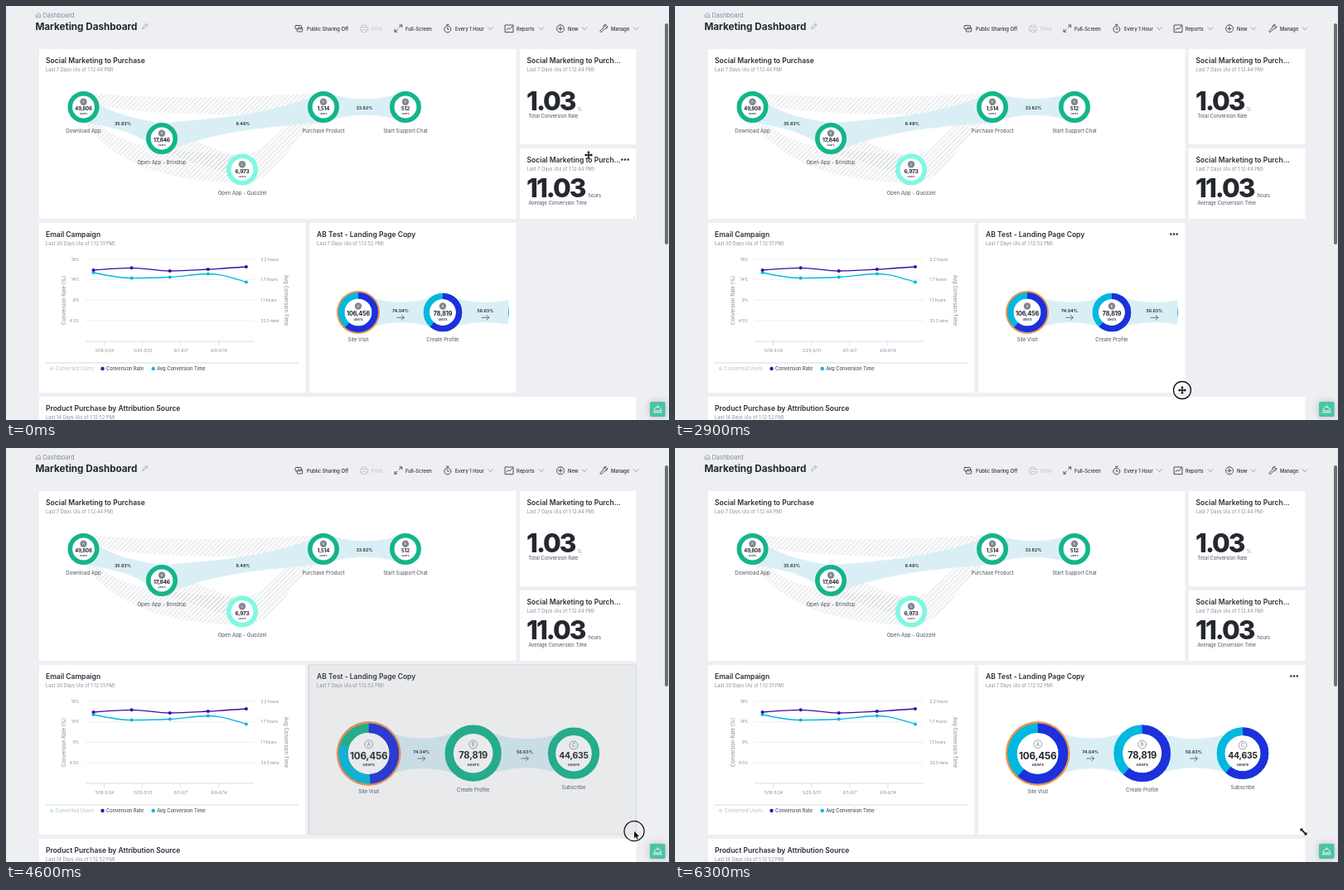
Animation, 800 px wide and 500 px high, one loop 6.4 s. Source, as an HTML page:

```html
<!DOCTYPE html>
<html lang="en">
<head>
<meta charset="utf-8">
<title>Marketing Dashboard</title>
<style>
html, body { margin: 0; width: 100%; height: 100%; overflow: hidden; background: #eeeff3; }
svg { display: block; width: 800px; height: 500px; font-family: Inter, sans-serif; }
text { fill: #4b5060; font-size: 5.8px; }
.h1 { font-size: 11.65px; font-weight: 700; fill: #23262e; }
.title { font-size: 8.5px; font-weight: 600; fill: #2b2e36; }
.sub { font-size: 5.7px; fill: #8b8f9c; }
.crumb { font-size: 7.4px; fill: #858996; }
.tool { font-weight: 500; fill: #2d3038; }
.off { fill: #c3c6ce; }
.mid { text-anchor: middle; }
.end { text-anchor: end; }
.big { font-size: 31.5px; font-weight: 800; letter-spacing: -2px; fill: #25282f; }
.num { font-weight: 700; fill: #23262e; letter-spacing: -.2px; }
.users { font-weight: 600; fill: #33363e; }
.name { font-size: 6.1px; }
.pct { font-size: 5.3px; font-weight: 600; fill: #22252c; }
.tick { font-size: 4.8px; fill: #80859a; }
.axis { font-size: 6.1px; fill: #80859a; }
.legend { font-size: 5.75px; font-weight: 500; }
.badge { fill: #fff; }
.outlined { fill: #6c747e; }
.card { fill: #fff; }
.flow { fill: #daeff5; }
.hatch { fill: url(#hatch); }
.icon { fill: none; stroke: #3a3d45; stroke-width: .9; stroke-linejoin: round; stroke-linecap: round; }
.help { filter: drop-shadow(0 0 4px rgba(40, 50, 70, .28)); }
</style>
</head>
<body>
<svg id="stage" viewBox="0 0 800 500"></svg>
<script>
const LOOP = 6400, STEP = 100;
const BLUE = '#1f2fdc', CYAN = '#02b8de', GREEN = '#14b58b', PURPLE = '#3a0ca8', BLUE_SHARE = .615;

const text = (x, y, s, cls = '', size) =>
  `<text x="${x}" y="${y}" class="${cls}"${size ? ` style="font-size:${size}px"` : ''}>${s}</text>`;
const rect = (x, y, w, h, attrs) => `<rect x="${x}" y="${y}" width="${w}" height="${h}" ${attrs}/>`;
const dot = (x, y, r, fill, attrs = '') => `<circle cx="${x}" cy="${y}" r="${r}" fill="${fill}" ${attrs}/>`;
const path = (d, attrs) => `<path d="${d}" ${attrs}/>`;
const icon = (d, attrs = '') => path(d, `class="icon" ${attrs}`);
const heading = (x, y, title, sub) => text(x, y, title, 'title') + text(x, y + 10, sub, 'sub');
const chevron = x => icon(`M${x - 2.8} 25.8l2.8 3 2.8-3`, 'style="stroke:#777b86;stroke-width:.7"');

// Three dots plus the resize corner, which sits "drop" below them.
const menu = (id, drop) => `<g id="${id}">${[-3.7, 0, 3.7].map(x => dot(x, 0, 1.25, '#2b2e36')).join('')}
  ${path(`M11.5 ${drop}v1.3h-1.3`, 'fill="none" stroke="#a5a8b0" stroke-width=".6"')}</g>`;

// Band between two nodes that is pinched in the middle.
function band(x1, y1, h1, x2, y2, h2, pinch) {
  const a = x1 + (x2 - x1) * .36, b = x1 + (x2 - x1) * .64, m = (y1 + y2) / 2;
  return path(`M${x1} ${y1 - h1}C${a} ${m - pinch} ${b} ${m - pinch} ${x2} ${y2 - h2}
    V${y2 + h2}C${b} ${m + pinch} ${a} ${m + pinch} ${x1} ${y1 + h1}Z`, 'class="flow"');
}

function header() {
  return icon('M36.5 10.5l2.7-2 2.7 2v3.2h-5.4zM38 11.8h2.4', 'style="stroke:#858996;stroke-width:.7"') +
    text(44.5, 14, 'Dashboard', 'crumb') + text(35.5, 29, 'Marketing Dashboard', 'h1') +
    icon('M164.8 27.3l.6-2.1 4.2-4 1.5 1.5-4.2 4zM168.6 22.2l1.5 1.5', 'style="stroke:#9598a3;stroke-width:.7"') +
    icon('M350 23.5h5.5q1 0 1 1v2.2q0 1-1 1H350q-1 0-1-1v-2.2q0-1 1-1zM352.5 26h4q1.2 0 1.2 1v3q0 1-1 1h-4.5q-1 0-1-1v-2') +
    text(363, 29.6, 'Public Sharing Off', 'tool') +
    icon('M429.5 25.5v-2.5h5v2.5M429 30h-1.5v-4.5h9v4.5H435M429.5 28.5h5v3h-5z', 'style="stroke:#c3c6ce"') +
    text(441, 29.6, 'Print', 'tool off') +
    icon('M474.5 25.7l3-2.7M475 23h2.7v2.7M472.3 28l-3 3M469 28.5v2.7h2.7') +
    text(482, 29.6, 'Full-Screen', 'tool') +
    icon('M532.8 24a4 4 0 1 0 .1 0M531.5 22.3h2.7M532.8 26v2.2h1.5') +
    text(542, 29.6, 'Every 1 Hour', 'tool') + chevron(584.5) +
    icon('M602.5 23h9.5v8.7h-9.5zM604 29l2-2.5 1.8 1.5 3-3.5') +
    text(616, 29.6, 'Reports', 'tool') + chevron(646) +
    icon('M669 22.8a4.5 4.5 0 1 0 .1 0M669 25v4.6M666.7 27.3h4.6') +
    text(678, 29.6, 'New', 'tool') + chevron(698) +
    icon('M717 30l4-4q-.7-2.5 1.8-3.5l1.3-.1-1.6 1.8 1.5 1.5 1.7-1.7q.5 3.5-3.3 3.6l-4 4z') +
    text(730, 29.6, 'Manage', 'tool') + chevron(760);
}

function smallNode(x, y, color, letter, count, size, label) {
  return dot(x, y, 16.2, '#fff', `stroke="${color}" stroke-width="5.6"`) +
    dot(x, y - 6.3, 4.2, '#7e8791') + text(x, y - 4.8, letter, 'mid badge', 4) +
    text(x, y + 4.3, count, 'num mid', size) + text(x, y + 9, 'users', 'users mid', 3.3) +
    text(x, y + 30.5, label, 'name mid');
}

function funnel() {
  return rect(40, 52, 575.5, 205, 'class="card"') +
    heading(48, 69.3, 'Social Marketing to Purchase', 'Last 7 Days (As of 1:12:44 PM)') +
    path('M94 104C150 112 300 112 383 104V131C310 132 190 133 120 122Z', 'class="hatch"') +
    path('M94 122C130 176 190 172 285 181V214C190 212 130 190 94 140Z', 'class="hatch"') +
    path('M188 142C220 156 245 176 285 180V205C245 198 220 184 188 178Z', 'class="hatch"') +
    path('M285 180C322 178 340 122 383 122V140C350 142 332 212 285 216Z', 'class="hatch"') +
    band(94, 122, 18, 188, 160, 18, 7) +
    band(188, 160, 18, 383, 122, 18, 7) +
    band(383, 122, 18, 482, 122, 18, 7) +
    smallNode(93.5, 122, GREEN, 'A', '49,808', 6, 'Download App') +
    smallNode(188, 160, GREEN, 'B', '17,846', 6.7, 'Open App - Brindlop') +
    smallNode(285, 197.5, '#80f8e2', 'C', '6,973', 6.5, 'Open App - Quozzel') +
    smallNode(383, 122, GREEN, 'D', '1,514', 6.2, 'Purchase Product') +
    smallNode(482, 122, GREEN, 'E', '512', 6.2, 'Start Support Chat') +
    text(141, 144, '35.83%', 'pct mid') + text(286, 144, '8.48%', 'pct mid') + text(432.5, 125, '33.82%', 'pct mid');
}

function metrics() {
  const card = (y, h) => rect(620, y, 140.5, h, 'class="card"') +
    heading(628.5, y + 17.3, 'Social Marketing to Purch...', 'Last 7 Days (As of 1:12:44 PM)');
  return card(52, 115) + text(628, 126, '1.03', 'big') + text(689.5, 126.7, '%', 'sub') +
    text(630.5, 134.5, 'Total Conversion Rate') +
    card(172, 85) + text(628, 230.5, '11.03', 'big') + text(702.5, 231.3, 'hours') +
    text(630.5, 239.6, 'Average Conversion Time') +
    `<g transform="translate(747 185.5)">${menu('metricMenu', 68.5)}</g>`;
}

// Monotone curve: flat at every local extreme.
function series(ys, color) {
  const gap = 46.1, xs = ys.map((_, i) => 105.5 + i * gap), last = ys.length - 1;
  const rise = i => ys[i + 1] - ys[i];
  const inner = i => rise(i - 1) * rise(i) > 0 ? (rise(i - 1) + rise(i)) / 2 : 0;
  const slope = i => i === 0 ? (3 * rise(0) - inner(1)) / 2
    : i === last ? (3 * rise(last - 1) - inner(last - 1)) / 2 : inner(i);
  let d = `M${xs[0]} ${ys[0]}`;
  for (let i = 1; i <= last; i++)
    d += `C${xs[i - 1] + gap / 3} ${ys[i - 1] + slope(i - 1) / 3} ${xs[i] - gap / 3} ${ys[i] - slope(i) / 3} ${xs[i]} ${ys[i]}`;
  return path(d, `fill="none" stroke="${color}" stroke-width="1.3"`) +
    xs.map((x, i) => dot(x, ys[i], 2, color)).join('');
}

function campaign() {
  const rows = [['18%', '2.2 hours'], ['14%', '1.7 hours'], ['9%', '1.1 hours'], ['4.5%', '33.3 mins']];
  const weeks = ['5/18-5/24', '5/25-5/31', '6/1-6/7', '6/8-6/14'];
  const key = (x, color, label, cls = '') => dot(x, 438, 2.2, color) + text(x + 4.5, 440.2, label, 'legend ' + cls);
  return rect(40, 262, 321.5, 205, 'class="card"') +
    heading(48, 279.3, 'Email Campaign', 'Last 30 Days (As of 1:12:51 PM)') +
    rows.map(([l, r], i) => {
      const y = 306 + i * 24.7;
      return path(`M96 ${y}H299.5`, 'stroke="#e6e8ee" stroke-width=".7"') +
        text(88.5, y + 1.7, l, 'tick end') + text(307.5, y + 1.7, r, 'tick');
    }).join('') +
    path('M96 405H299.5', 'stroke="#cdd3e4" stroke-width=".8"') +
    weeks.map((w, i) => path(`M${118.5 + i * 46.1} 405v5`, 'stroke="#cdd3e4" stroke-width=".8"') +
      text(119 + i * 46, 418, w, 'tick mid')).join('') +
    `<g transform="translate(71.5 355.5) rotate(-90)">${text(0, 0, 'Conversion Rate (%)', 'axis mid')}</g>
     <g transform="translate(335.5 355.5) rotate(90)">${text(0, 0, 'Avg Conversion Time', 'axis mid')}</g>` +
    series([322, 328.6, 327.5, 323.5, 333.5], CYAN) + series([319, 316.3, 320, 318, 315], PURPLE) +
    path('M48 431H353', 'stroke="#d3d5dc" stroke-width=".9"') +
    key(55, '#c4f0e5', 'Converted Users', 'off') + key(116.5, PURPLE, 'Conversion Rate') +
    key(177.7, CYAN, 'Avg Conversion Time');
}

function donut(n, large) {
  const { x, y, r, hole, letter, count, size, label, labelY } = n;
  const w = r - hole, mid = (r + hole) / 2;
  const arc = (cls, color) => dot(x, y, mid, 'none',
    `class="${cls}" pathLength="1" stroke="${color}" stroke-width="${w}" transform="rotate(-90 ${x} ${y})"`);
  const by = y - (large ? r * .31 : 7.5);
  const badge = large
    ? dot(x, by, 4.9, '#fff', 'stroke="#7e8791" stroke-width=".8"') + text(x, by + 2.1, letter, 'mid outlined', 5.8)
    : dot(x, by, 4.2, '#7e8791') + text(x, by + 1.5, letter, 'mid badge', 4);
  return '<g class="donut">' + (letter === 'A' ? dot(x, y, r + (large ? 2.4 : 2), '#f5924a') : '') +
    dot(x, y, mid, '#fff', `stroke="${GREEN}" stroke-width="${w - .4}"`) + arc('cyan', CYAN) + arc('blue', BLUE) +
    badge + text(x, y + (large ? 6.5 : 4.2), count, 'num mid', size) +
    text(x, y + (large ? 14.8 : 10), 'users', 'users mid', large ? 5.4 : 4) +
    text(x, labelY, label, 'name mid') + '</g>';
}

function abChart(id, nodes, halves, pinch, mids, large) {
  const [a, b, c] = nodes, y = large ? 368.5 : 369.8;
  const link = (x, s) => text(x, y, s, 'pct mid') +
    icon(`M${x - 4.3} ${y + 6.5}h8.6m-3-3l3 3l-3 3`, 'style="stroke-width:.7"');
  return `<g id="${id}">` + band(a.x, a.y, halves[0], b.x, b.y, halves[1], pinch) +
    band(b.x, b.y, halves[1], c.x, c.y, halves[2], pinch) +
    link(mids[0], '74.04%') + link(mids[1], '56.63%') + nodes.map(n => donut(n, large)).join('') + '</g>';
}

const node = (letter, label, count, x, y, r, hole, size, labelY) => ({ letter, label, count, x, y, r, hole, size, labelY });
const smallNodes = [
  node('A', 'Site Visit', '106,456', 425, 370, 24, 16.5, 7.3, 405),
  node('B', 'Create Profile', '78,819', 527, 370, 23.3, 16, 7.3, 405),
  node('C', 'Subscribe', '44,635', 628.8, 370, 23, 16, 7.3, 405)];
const largeNodes = [
  node('A', 'Site Visit', '106,456', 437.7, 369, 36.5, 25, 11.7, 416.5),
  node('B', 'Create Profile', '78,819', 563.7, 368.7, 34.3, 23.6, 11.2, 415),
  node('C', 'Subscribe', '44,635', 685, 368.7, 31.3, 21.6, 10.4, 411.5)];

function abCard() {
  return rect(365.5, 262, 0, 205, 'id="slot" fill="#e0e2e8"') + rect(366, 262, 0, 205, 'id="abBox" class="card"') +
    heading(375, 279.3, 'AB Test - Landing Page Copy', 'Last 7 Days (As of 1:12:52 PM)') +
    `<g clip-path="url(#abClip)">${abChart('small', smallNodes, [23, 22, 21], 9, [476, 578.5], false)}
    ${abChart('large', largeNodes, [36, 33, 30], 13, [501.3, 626], true)}</g>` +
    rect(365.5, 261.8, 0, 205, 'id="shade" fill="#767c8c" fill-opacity=".16" stroke="#767c8c" stroke-opacity=".2" stroke-width=".8"') +
    menu('abMenu', 188.5);
}

const pointerShape = d => path(d, 'fill="#111" stroke="#fff" stroke-width=".6" paint-order="stroke"');
const cursors = {
  move: pointerShape('M0-5l2 2.3H.7V-.7H2.7V-2L5 0 2.7 2V.7H.7V2.7H2L0 5-2 2.7H-.7V.7H-2.7V2L-5 0-2.7-2V-.7H-.7V-2.7H-2Z'),
  arrow: pointerShape('M0 0V8.6L2 6.8 3.3 9.8 4.7 9.2 3.4 6.3H6Z'),
  resize: pointerShape('M-4-4H-.4L-1.5-2.7 2.7 1.5 4 .4V4H.4L1.5 2.7-2.7-1.5-4-.4Z')
};

const stage = document.getElementById('stage');
stage.innerHTML = `<defs>
  <pattern id="hatch" width="4" height="4" patternUnits="userSpaceOnUse" patternTransform="rotate(45)">
    <path d="M1 0V4" stroke="#c9cbd0" stroke-width=".7"/></pattern>
  <clipPath id="abClip">${rect(366, 290, 0, 170, 'id="clipBox"')}</clipPath></defs>` +
  rect(0, 0, 800, 500, 'fill="#eeeff3"') + header() + funnel() + metrics() + campaign() +
  rect(40, 472, 720.5, 28, 'class="card"') +
  heading(48, 489.3, 'Product Purchase by Attribution Source', 'Last 14 Days (As of 1:12:52 PM)') + abCard() +
  rect(795, 21, 4, 267, 'rx="2" fill="#6d6e72"') +
  rect(777, 478, 18.5, 18, 'rx="1.5" fill="#4cc3a2" class="help"') +
  icon('M782 488.5a4.3 4.3 0 0 1 8.6 0zM781 490.8h10.6M786.3 484v-1.5', 'style="stroke:#fff"') +
  '<g id="cursor">' + dot(0, 0, 10.5, 'none', 'id="press" stroke="#15161a" stroke-width="1.3"') +
  Object.entries(cursors).map(([k, v]) => `<g id="${k}">${v}</g>`).join('') + '</g>';

const $ = id => document.getElementById(id);
const show = (id, on) => $(id).setAttribute('display', on ? 'inline' : 'none');
const donuts = [...$('large').querySelectorAll('.donut')];

const route = [
  [0, 703, 180], [200, 702, 186], [500, 684, 258], [900, 607, 400], [1100, 612, 412], [1400, 621, 417],
  [1700, 618, 440], [2100, 612, 464], [2900, 612, 464], [3100, 618, 463.5], [3300, 649, 462], [3400, 660.5, 462],
  [3600, 717, 462], [3800, 750, 461], [4000, 760, 461], [4100, 758, 461], [4700, 758, 463], [LOOP, 758.5, 463.5]];

function pointer(t) {
  const i = Math.max(1, route.findIndex(p => p[0] >= t));
  const [a, b] = [route[i - 1], route[i]], k = (t - a[0]) / (b[0] - a[0]);
  return [a[1] + (b[1] - a[1]) * k, a[2] + (b[2] - a[2]) * k];
}

const GROW = 4400, DROP = 5300;

function cursorKind(t) {
  if (t < 500) return 'move';
  if (t < 800) return 'arrow';
  if (t < 1100) return 'move';
  if (t < 1800) return 'arrow';
  if (t < 3000) return 'move';
  if (t < 3900) return 'resize';
  return t < DROP ? 'arrow' : 'resize';
}

function sweep(group, p) {
  for (const [cls, share] of [['cyan', 1], ['blue', BLUE_SHARE]])
    group.querySelector('.' + cls).setAttribute('stroke-dasharray', `${share * p} 2`);
}

function render(t) {
  const [x, y] = pointer(t), kind = cursorKind(t);
  $('cursor').setAttribute('transform', `translate(${x} ${y})`);
  for (const k in cursors) show(k, k === kind);
  show('press', t >= 2800 && t < DROP);
  $('press').setAttribute('r', t < 3600 ? 10.5 : 12);

  // The card edge trails the pointer and snaps to the grid.
  const drag = t >= 3000 && t < DROP;
  const edge = t < 3000 ? 615.5 : t >= 4100 ? 760.5 : Math.min(760.5, pointer(t - 100)[0] + 3);
  const height = drag && t >= 3800 && t < GROW ? 202 : 205;
  $('abBox').setAttribute('width', edge - 366);
  $('shade').setAttribute('width', edge - 365.5);
  $('slot').setAttribute('width', edge - 365);
  $('abBox').setAttribute('height', height);
  $('shade').setAttribute('height', height);
  $('clipBox').setAttribute('width', edge - 375);
  show('slot', drag);
  show('shade', drag);

  $('abMenu').setAttribute('transform', `translate(${edge - 13.5} 275.5)`);
  show('abMenu', t >= 800 && !drag);
  show('metricMenu', t < 500);
  show('small', t < GROW);
  show('large', t >= GROW);
  donuts.forEach((d, i) => sweep(d, Math.min(1, Math.max(0, (t - GROW - i * 225) / 250))));
}

$('small').querySelectorAll('.donut').forEach(d => sweep(d, 1));
const start = performance.now();
function tick() {
  const t = (performance.now() - start) % LOOP;
  render(Math.floor(t / STEP) * STEP);
  requestAnimationFrame(tick);
}
tick();
</script>
</body>
</html>
```
